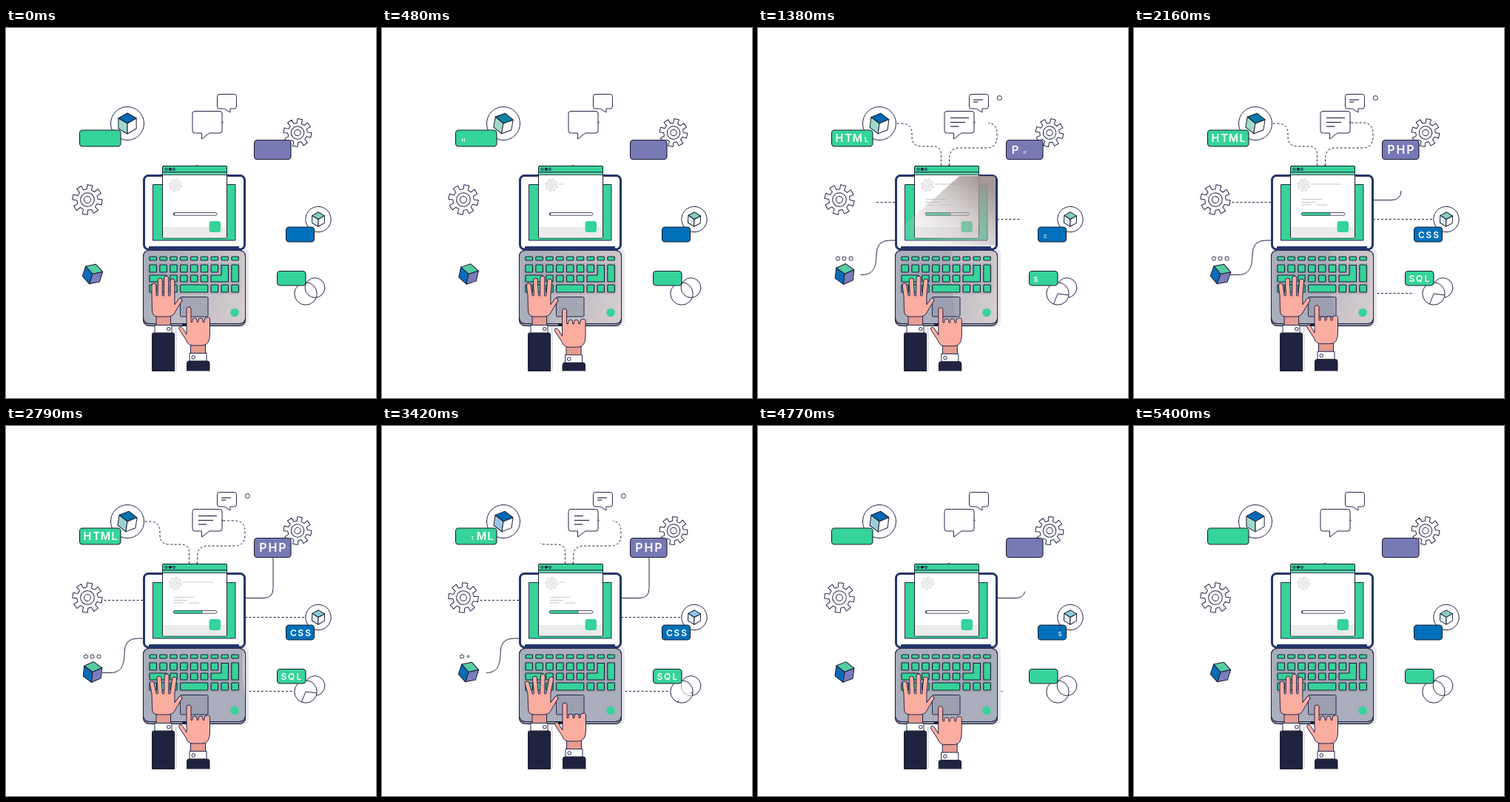
These frames come from a looping animation (500x500 px, 5430 ms). An HTML page:

```html
<!DOCTYPE html>
<html lang="en">
<head>
<meta charset="utf-8">
<title>Web development</title>
<style>
html, body { margin: 0; width: 100%; height: 100%; overflow: hidden; background: #fff }
svg { display: block; width: 500px; height: 500px }
text { font-family: Inter, Lato, sans-serif; font-weight: 600; fill: #fff; stroke: none; text-anchor: middle }
</style>
</head>
<body>
<svg id="stage" viewBox="0 0 500 500" fill="none" stroke="#25264a" stroke-linejoin="round"></svg>
<script>
const LOOP = 5430, GREEN = '#36d39a', INK = '#1c1e33', SKIN = '#fbada0';
const stage = document.getElementById('stage');
const clamp = v => Math.max(0, Math.min(1, v));

// Rises from 0 to 1 over a..b, falls back over c..d.
const span = (t, a, b, c, d) => Math.min(clamp((t - a) / (b - a)), clamp((d - t) / (d - c)));

// Eased interpolation through [time, value] pairs.
function keys(t, list) {
  const i = list.findIndex(k => k[0] > t);
  if (i < 0) return list.at(-1)[1];
  const [t0, v0] = list[i - 1], [t1, v1] = list[i], p = (t - t0) / (t1 - t0);
  return v0 + (v1 - v0) * p * p * (3 - 2 * p);
}

const mix = (a, b, p) => `color-mix(in srgb, ${b} ${(p * 100).toFixed(1)}%, ${a})`;
const rect = (x, y, x2, y2, r, attrs = '') =>
  `<rect x="${x}" y="${y}" width="${Math.max(0, x2 - x)}" height="${y2 - y}" rx="${r}" ${attrs}/>`;
const circle = (x, y, r, attrs = '') => `<circle cx="${x}" cy="${y}" r="${r}" ${attrs}/>`;
const path = (d, attrs = '') => `<path d="${d}" ${attrs}/>`;
const group = (attrs, body) => `<g ${attrs}>${body}</g>`;
const bar = (x, y, w, p, attrs = '') => p > 0 ? path(`M${x} ${y}h${w * p}`, attrs) : '';

function gear(x, y, R, turn, attrs = '') {
  const pts = [];
  for (let i = 0; i < 8; i++)
    for (const [da, r] of [[-.22, .7], [-.18, 1], [.18, 1], [.22, .7]]) {
      const a = i * Math.PI / 4 + da;
      pts.push((Math.cos(a) * r * R).toFixed(2) + ' ' + (Math.sin(a) * r * R).toFixed(2));
    }
  return group(`transform="translate(${x} ${y}) rotate(${turn})" ${attrs}`,
    path('M' + pts.join('L') + 'Z', 'fill="#fff"') + circle(0, 0, R * .46) + circle(0, 0, R * .22));
}

function cube(x, y, r, turn, top, left, right) {
  const w = r * .866, h = r / 2;
  return group(`transform="translate(${x} ${y}) rotate(${turn})" stroke="${INK}"`,
    path(`M0 0L${-w} ${-h}L0 ${-r}L${w} ${-h}Z`, `fill="${top}"`) +
    path(`M0 0L${-w} ${-h}V${h}L0 ${r}Z`, `fill="${left}"`) +
    path(`M0 0L${w} ${-h}V${h}L0 ${r}Z`, `fill="${right}"`));
}

// Letters pop up from the baseline one after another, then shrink away.
function label(t, x, y, x2, y2, color, word, size, first, step, base, start, end, inGap, outGap) {
  let out = rect(x, y, x2, y2, 4, `fill="${color}" stroke="${INK}" stroke-width="1.1"`);
  [...word].forEach((ch, i) => {
    const a = start + i * inGap, c = end + i * outGap, s = span(t, a, a + 270, c, c + 290);
    if (s > 0) out += `<text font-size="${size}" transform="translate(${first + i * step} ${base}) scale(${s})">${ch}</text>`;
  });
  return out;
}

// Wires start at the laptop and are drawn outwards.
const wires = [
  ['M247.5 186V171Q247.5 160 236.5 160H221Q208 160 208 147V143Q208 129 194 129H187', 1, 108, 620, 1110, 3180, 3680],
  ['M258.5 186V177Q258.5 162 273 162H309Q323 162 323 147V143Q323 128 309 128H292', 1, 144, 593, 1558, 3300, 3940],
  ['M185 235.5H131', 1, 54, 930, 1800, 3750, 4480],
  ['M185 287H178Q160 287 160 306C160 324 155 333.5 141 333.5H130', 0, 88, 650, 1480, 3320, 4000],
  ['M323 232.5H348Q361 232.5 361 219.5V178', 0, 89, 1600, 2700, 4400, 5100],
  ['M323 258.5H404', 1, 81, 1050, 1850, 3850, 4550],
  ['M323 358.5H389', 1, 66, 1550, 2280, 4130, 4850]
];
function wire(t, [d, dashed, length, ...times]) {
  const v = span(t, ...times) * length;
  if (v <= 0) return '';
  const dash = dashed
    ? '3 2.5 '.repeat(Math.floor(v / 5.5)) + Math.min(3, v % 5.5) + ' 999'
    : v + ' 999';
  return path(d, `stroke-dasharray="${dash}"`);
}

const defs = `<defs>
<linearGradient id="base" gradientUnits="userSpaceOnUse" x1="190" y1="330" x2="322" y2="385">
<stop stop-color="#a9adba"/><stop offset="1" stop-color="#d6cdcf"/></linearGradient>
<linearGradient id="glare" gradientUnits="userSpaceOnUse" x1="225" y1="292" x2="300" y2="205">
<stop stop-color="#d8d3d2" stop-opacity=".15"/><stop offset="1" stop-color="#9d9190" stop-opacity=".92"/></linearGradient>
<clipPath id="deck"><rect x="186" y="301" width="137" height="98" rx="7"/></clipPath>
<clipPath id="floor"><rect width="500" height="463.5"/></clipPath></defs>`;

const keyX = i => 194 + i * 13.85;
const key = (col, y, y2, cols = 1) => rect(keyX(col), y, keyX(col + cols - 1) + 9.5, y2, 1);
let keyboard = '';
for (let i = 0; i < 9; i++) {
  keyboard += key(i, 309, 314);
  if (i < 7) keyboard += key(i, 320, 330);
  if (i > 1 && i < 6) keyboard += key(i, 334, 343);
  if (i < 3 || i > 5) keyboard += key(i, 347, 357);
}
keyboard += key(0, 334, 343, 2) + key(3, 347, 357, 3) + key(8, 320, 343) +
  path('M291 320.5h9.5v22.5h-23.5v-9h14Z');
keyboard = rect(191.5, 317.5, 316.5, 359.5, 2, 'fill="#8f93a5" fill-opacity=".35" stroke="none"') +
  group(`fill="${GREEN}" stroke="${INK}" stroke-width="1.1"`, keyboard);

const lid = rect(191, 297, 328, 404, 8, 'fill="#e9e9ee" stroke="none"') +
  rect(186.5, 199.5, 322.5, 299, 6, 'fill="#fff" stroke="#25356c" stroke-width="3"') +
  rect(198.5, 211.5, 310, 287, 0, `fill="${GREEN}"`) +
  rect(193, 295, 315, 300, 1, 'fill="#25356c" stroke="none"');

function screen(t, turn) {
  const text = span(t, 700, 1300, 3700, 4150);
  const fill = keys(t, [[0, 0], [600, 0], [960, 11.5], [1380, 32], [1650, 37], [3500, 37], [4150, 0]]);
  let out = rect(211.5, 186.5, 298.5, 284, 2, `fill="#fff" stroke="${INK}"`) +
    rect(212, 269, 298, 283.5, 1, 'fill="#ececec" stroke="none"') +
    rect(211.5, 186.5, 298.5, 195, 1.5, `fill="${GREEN}" stroke="${INK}"`) +
    rect(211.5, 195, 298.5, 198.5, 0, `fill="#5fdcb0" stroke="${INK}" stroke-width=".8"`) +
    circle(216.5, 190.8, 1.6, `stroke="${INK}"`) +
    circle(221.8, 190.8, 1.7, `fill="${INK}"`) +
    circle(226.8, 190.8, 1.6, `stroke="${INK}"`) +
    gear(229, 212.5, 8.2, 12 + turn, 'stroke="#c9c9cf" stroke-width=".8"') +
    group('stroke="#c8c8ce"',
      bar(239, 211, 41, span(t, 400, 900, 3050, 3510)) + bar(226.5, 231.5, 28, text) +
      bar(226.5, 235.5, 19, text) + bar(226.5, 239, 13, text) + bar(247, 239, 14, text)) +
    rect(226.5, 249.5, 285, 253.2, 1.8, `fill="#fff" stroke="#3c3d50" stroke-width=".9"`) +
    rect(226.5, 249.5, 228 + fill, 253.2, 1.8, `fill="${fill ? GREEN : '#777985'}" stroke="#3c3d50" stroke-width=".7"`) +
    rect(274.5, 261, 290, 276, 3, `fill="${GREEN}" stroke="none"`);
  const shine = Math.max(span(t, 1130, 1300, 1500, 1750), span(t, 3900, 4100, 4350, 4600));
  if (shine > 0)
    out += path('M188 275L272 200H317Q321 200 321 204V294H188Z', `fill="url(#glare)" stroke="none" opacity="${shine}"`);
  return out;
}

function deck(t) {
  const edge = keys(t, [[0, 188], [960, 250], [1380, 262], [2160, 266], [2900, 325]]);
  const sheen = edge < 324
    ? path(`M${edge} 300Q${edge - 6} 350 ${edge + 10} 404H330V300Z`, 'fill="url(#base)" stroke="none" clip-path="url(#deck)"')
    : '';
  return rect(185.5, 300.5, 323.5, 402.5, 8, `fill="#8d91a3" stroke="${INK}" stroke-width="1.2"`) +
    rect(185.5, 300.5, 323.5, 399.5, 8, 'fill="#abaebc"') + sheen +
    rect(185.5, 300.5, 323.5, 399.5, 8) + keyboard +
    rect(235.5, 363.5, 273, 390, 1.5, 'fill="#9296a8" fill-opacity=".6"') +
    rect(238, 399, 246, 402.5, 1, `fill="${INK}" stroke="none"`) +
    circle(309, 384.5, 5.8, `fill="${GREEN}" stroke="none"`);
}

function leftHand(t) {
  const s = keys(t, [[0, 0], [960, 1], [1380, .6], [2160, .5], [3420, 1.2], [4200, 1], [5400, 0]]);
  const fingers = [[348, -3.2], [341, -1.6], [338, .6], [342, 3.2]];
  let d = 'M197 362';
  fingers.forEach(([tip, lean], i) => {
    const x = 197 + i * 8.3, tx = x + lean * s;
    d += `L${tx} ${tip}a3 3 0 0 1 6 0L${x + 6} 361`;
    if (i < 3) d += 'a1.15 1.15 0 0 0 2.3 0';
  });
  d += 'V374L233.5 366q4-3 4.5 2L229 383Q226 390 219 390H205Q198 390 197.5 382Z';
  return rect(228, 404, 231, 463, 0, 'fill="#e4e4e8" stroke="none"') +
    rect(203, 386, 222.5, 403, 0, 'fill="#e69c90"') +
    path(d, `fill="${SKIN}"`) +
    rect(201, 401.5, 224, 413, 0, 'fill="#fff"') + circle(219.8, 406.8, 2.3) +
    path('M197.5 463.5V414q0-2 2-2h26q2 0 2 2v49.5Z', `fill="#20233f" stroke="${INK}"`);
}

function rightHand(t) {
  const y = keys(t, [[0, 0], [960, 4.5], [1380, .8], [2160, -2.3], [2800, 0], [3420, -3], [4200, 3], [5400, 0]]);
  const bump = 'v-2q0-3 3-3t3 3v2q1 2 2 0';
  const d = 'M244 380a3 3 0 0 1 6 0V397q1 2 2 0' + bump + bump +
    'v-2q0-4 4-4t3.5 3V414Q275.5 429 265 429H252Q246 429 243 421L234.5 408q-2-4 1-4.5q2 0 4 3L244 414Z';
  return group('clip-path="url(#floor)"', group(`transform="translate(${-Math.max(0, y) * .2} ${y})"`,
    rect(249.5, 424, 269.5, 442, 0, 'fill="#e69c90"') +
    path(d, `fill="${SKIN}"`) +
    rect(248, 439.5, 271, 451, 0, 'fill="#fff"') + circle(253.2, 445, 2.3) +
    rect(244.5, 450, 275, 480, 3, `fill="#20233f" stroke="${INK}"`)));
}

function bubbles(t) {
  const dot = span(t, 900, 1250, 3600, 4000);
  return path('M255 112.5H289q3 0 3 3V139q0 3-3 3H275L264.5 150V142H255q-3 0-3-3V115.5q0-3 3-3Z', 'fill="#fff"') +
    circle(292.5, 127.5, .6) +
    path('M288 89.5H308.5q3 0 3 3V106q0 3-3 3H303V114L295 109H288q-2.5 0-2.5-3V92.5q0-3 2.5-3Z', 'fill="#fff"') +
    group('stroke-width="1.2"',
      bar(260, 121.5, 25, span(t, 700, 1060, 3180, 3640)) +
      bar(260, 127.5, 20, span(t, 800, 1200, 3500, 3900)) +
      bar(260, 133, 11, span(t, 800, 1200, 3600, 4000)) +
      bar(291, 97, 13, span(t, 920, 1250, 3650, 4180)) +
      bar(291, 100, 6, span(t, 1000, 1300, 3600, 4250))) +
    (dot ? circle(323 + dot * 3.3, 94.5, dot * 3) : '');
}

function pie(t) {
  const p = span(t, 750, 1250, 3000, 3520);
  return circle(417.5, 351, 13.4) +
    circle(405, 359, 15.2, `fill="#fff" fill-opacity="${clamp(p * 3)}"`) +
    (p ? path(`M399.5 373l${5.5 * p} ${-14 * p}M420 361l${-15 * p} ${-2 * p}`) : '');
}

function draw(t) {
  const turn = 5 * Math.sin(t / LOOP * 2 * Math.PI);
  const tilt = keys(t, [[0, 0], [960, 20], [1380, 7], [2160, 9], [3420, 8], [4200, 13], [5400, 0]]);
  const sway = keys(t, [[0, 18], [960, 6], [1380, 6], [2160, 20], [2800, 6], [3420, 18], [4200, 0], [5400, 18]]);
  const warm = keys(t, [[0, 0], [960, 1], [1380, 0], [2160, .35], [3420, 0]]);
  const cool = keys(t, [[0, 0], [2300, 0], [3300, 1], [4300, 1], [5400, 0]]);
  const dots = [[125.5, 750, 950, 3050, 3350], [116.5, 800, 1050, 3250, 3600], [108, 850, 1200, 3500, 3800]];

  stage.innerHTML = defs + wires.map(w => wire(t, w)).join('') +
    circle(164, 129, 22.5, 'fill="#fff"') +
    cube(164, 129, 14, tilt, mix('#0068b5', '#20998d', warm), mix('#a0d9cb', '#9cc5e4', cool), '#fff') +
    label(t, 99.5, 138, 155, 160, GREEN, 'HTML', 14.5, 110, 12.2, 154, 360, 2860, 285, 390) +
    bubbles(t) +
    gear(394, 141.5, 19, 10 + turn) +
    label(t, 335.5, 151.5, 385, 177.5, '#7679b3', 'PHP', 16, 347.5, 13, 170, 1130, 3440, 170, 310) +
    gear(110, 232, 20.3, 10 + turn) +
    circle(422, 258.5, 17.2, 'fill="#fff"') +
    cube(422, 258.5, 9.7, tilt * .25, mix('#85cfc3', '#8fc6ea', cool), '#dcf1f5', '#fff') +
    label(t, 378.5, 269, 416.5, 289, '#0070bb', 'CSS', 12, 388.3, 9.9, 283.5, 1250, 4050, 280, 300) +
    pie(t) +
    label(t, 366.5, 328.5, 405, 348, GREEN, 'SQL', 12, 375.5, 10.2, 343, 1180, 3800, 280, 300) +
    cube(117, 332.5, 14, sway, '#56cba4', '#0a6cb8', '#7a7dbd') +
    dots.map(([x, ...times]) => {
      const s = span(t, ...times);
      return s ? circle(x, 311.5, s * 2.6) : '';
    }).join('') +
    lid + circle(258, 186, .7) + screen(t, turn) + deck(t) + leftHand(t) + rightHand(t);
}

function frame() {
  draw(performance.now() % LOOP);
  requestAnimationFrame(frame);
}
frame();
</script>
</body>
</html>
```
